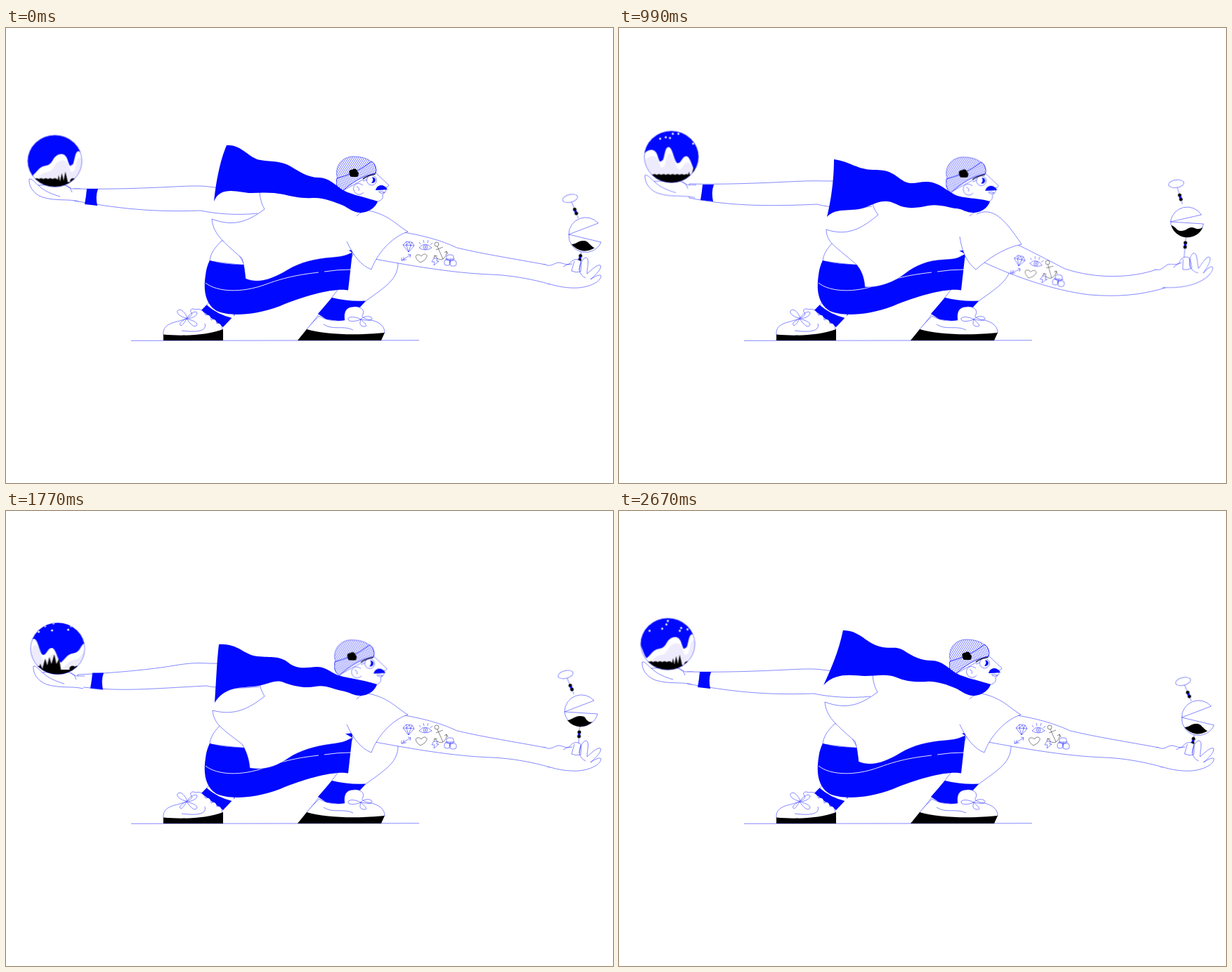
These frames come from a looping animation (864 px wide and 648 px high, 2700 ms). An HTML page without scripts:

```html
<!DOCTYPE html>
<html lang="en">
<head>
<meta charset="utf-8">
<title>Balancing act</title>
<style>
html, body { margin: 0; width: 100%; height: 100%; overflow: hidden; background: #fff; }
svg { display: block; width: 100vw; height: 100vh; fill: #fff; stroke: #0008ff; stroke-width: .48; stroke-linejoin: round; }
.move { animation: 2.7s linear infinite; }
.blue { fill: #0008ff; stroke: none; }
.black { fill: #000; stroke: none; }
.line { fill: none; }

#scarf { animation-name: scarf; }
@keyframes scarf {
  0%, 100% { d: path("M314 167C335 165 345 185 362 188S392 189 405 197S430 213 445 213S470 225 480 231S515 242 529 247C527 254 517 263 505 263S488 256 478 252S452 241 436 242S408 240 395 237S365 234 350 235S306 222 296 247C298 225 304 190 314 167Z"); }
  22.2% { d: path("M307 181C330 179 342 198 362 200S392 201 403 209S425 219 440 219S466 229 476 236S515 242 528 247C526 254 517 263 505 263S488 258 478 255S452 245 438 248S408 243 395 240S370 243 352 245S308 240 296 263C295 240 300 200 307 181Z"); }
  36.7% { d: path("M306 187C328 190 340 202 362 202S388 206 402 216S425 218 440 219S466 231 477 237S515 242 528 247C526 254 517 263 505 263S490 258 480 257S455 250 440 253S410 259 395 251S370 247 352 255S310 254 296 269C302 245 306 215 306 187Z"); }
  47.8% { d: path("M304 196C322 198 330 209 350 207S384 210 397 218S425 221 438 223S460 235 475 235S515 242 528 246C526 254 517 263 505 263S490 260 478 259S452 250 436 251S408 256 392 253S368 247 350 256S315 260 295 278C295 250 297 220 304 196Z"); }
  65.6% { d: path("M303 190C330 188 338 205 358 207S390 206 402 216S428 223 442 222S464 232 476 235S515 242 528 247C526 254 517 263 505 263S490 258 478 256S455 247 440 250S408 249 395 244S372 248 352 250S312 250 297 273C299 245 300 215 303 190Z"); }
  81.1% { d: path("M311 175C328 178 340 194 360 192S390 197 400 207S428 212 440 213S466 226 477 231S515 242 529 247C527 254 517 263 505 263S488 256 478 252S452 241 438 245S408 244 395 239S368 235 350 242S312 241 295 257C305 230 310 205 311 175Z"); }
  98.9% { d: path("M319 170C342 170 350 186 368 192S394 191 406 199S430 213 445 213S470 225 480 231S515 242 529 247C527 254 517 263 505 263S488 256 478 252S452 242 438 243S408 243 395 237S365 235 350 235S310 228 291 248C302 225 313 200 319 170Z"); }
}

#shirt { animation-name: shirt; }
@keyframes shirt {
  0%, 98.9%, 100% { d: path("M361 234Q362 248 368 258C345 275 325 284 293 272C295 292 306 302 336 328C339 337 340 348 341 357C360 365 380 357 400 345S440 329 462 327S482 324 493 320"); }
  22.2% { d: path("M361 242Q362 256 369 266C345 283 325 291 294 283C296 303 304 310 335 328C340 336 344 348 345 361C366 369 388 362 405 350S440 331 462 328S482 324 493 320"); }
  36.7% { d: path("M360 246Q362 258 369 266C345 286 325 297 295 287C296 305 304 308 337 336C344 343 349 354 350 369C370 370 392 362 407 350S440 331 462 330S482 327 493 322"); }
  47.8% { d: path("M361 250Q363 262 369 271C345 288 325 302 296 290C297 308 306 314 338 336C345 344 349 354 351 367C372 369 392 371 405 357S440 338 462 334S482 324 493 317"); }
  65.6% { d: path("M361 246Q362 254 368 264C345 282 325 292 294 284C296 303 306 309 336 332C341 340 346 352 347 366C368 370 386 363 402 352S440 335 462 332S482 328 493 323"); }
  81.1% { d: path("M361 238Q362 252 368 263C345 278 325 290 293 278C295 296 306 306 336 329C339 338 342 349 343 360C363 362 384 359 402 347S440 334 462 331S482 323 493 317"); }
}

#sleeve { animation-name: sleeve; }
@keyframes sleeve {
  0%, 65.6%, 100% { d: path("M516 260C545 266 555 280 572 290C548 298 528 322 520 344C505 338 495 325 485 304"); }
  22.2% { d: path("M508 265C530 255 550 270 573 304C548 314 528 328 510 345C496 335 489 322 484 298"); }
  36.7% { d: path("M509 265C532 254 549 272 573 308C545 314 524 330 508 344C495 334 488 318 485 297"); }
  47.8% { d: path("M509 265C532 257 550 273 575 300C547 306 527 325 515 344C501 336 492 322 488 300"); }
}

#reach { animation-name: reach; }
@keyframes reach {
  0%, 65.6%, 100% { d: path("M560 290C600 296 625 305 642 313C680 322 725 329 768 337L775 365C750 358 720 352 690 351C640 349 590 341 525 329"); }
  22.2% { d: path("M562 302C590 318 610 328 632 337C680 355 730 354 766 344L776 371C740 380 700 378 660 373C610 367 565 350 522 332"); }
  36.7% { d: path("M560 305C595 322 615 333 635 343C680 358 730 356 765 344L778 370C740 381 710 383 670 380C620 374 565 355 520 334"); }
  47.8% { d: path("M560 297C595 306 620 316 643 325C685 333 730 339 767 340L776 365C740 363 710 365 670 361C620 355 575 344 522 329"); }
}

#hand { animation-name: hand; transform-origin: 780px 345px; }
@keyframes hand {
  0%, 65.6%, 100% { transform: none; }
  22.2% { transform: translate(-2px, 5px) rotate(-8deg); }
  36.7% { transform: translate(-2px, 4px) rotate(-14deg); }
  47.8% { transform: translate(-1px, 2px) rotate(-7deg); }
}

#ink { animation-name: ink; }
@keyframes ink {
  0%, 65.6%, 100% { transform: translate(573px, 311px) rotate(0deg); }
  22.2% { transform: translate(570px, 327px) rotate(8deg); }
  36.7% { transform: translate(570px, 331px) rotate(8.5deg); }
  47.8% { transform: translate(573px, 321px) rotate(3.5deg); }
}

#hold { animation-name: hold; }
@keyframes hold {
  0%, 98.9%, 100% { d: path("M305 228C280 225 280 224 240 226S150 230 97 229L97 246C150 255 200 263 277 260C300 265 330 267 358 264"); }
  22.2% { d: path("M305 223C280 222 280 222 240 222S150 225 95 222L95 241C150 252 200 259 277 257C300 262 330 265 357 263"); }
  36.7% { d: path("M310 218C280 218 280 217 240 219S150 223 100 222L100 242C150 252 200 255 282 251C300 256 330 258 360 254"); }
  47.8% { d: path("M310 216C280 216 280 212 240 218S150 226 103 228L103 246C150 252 200 254 285 247C300 250 330 252 360 248"); }
  65.6% { d: path("M310 217C280 218 275 214 240 220S150 231 102 233L102 250C165 258 205 253 285 249C300 252 330 254 361 250"); }
  81.1% { d: path("M308 223C280 223 280 220 240 224S150 230 98 229L98 246C150 257 210 262 281 257C300 262 330 264 361 261"); }
}

#palm { animation-name: palm; }
@keyframes palm {
  0%, 98.9%, 100% { transform: none; }
  22.2% { transform: translate(-.5px, -7px); }
  36.7% { transform: translate(4px, -5.5px); }
  47.8% { transform: translate(7px, 2px); }
  65.6% { transform: translate(6px, 6px); }
  81.1% { transform: translate(1.5px, 2px); }
}

#band { animation-name: band; }
@keyframes band {
  0%, 98.9%, 100% { transform: none; }
  22.2% { transform: translate(-1px, -5.5px); }
  36.7% { transform: translate(4px, -6px); }
  47.8% { transform: translate(8.5px, -2.5px); }
  65.6% { transform: translate(8px, 1.5px); }
  81.1% { transform: translate(2px, .5px); }
}

#globe { animation-name: globe; }
@keyframes globe {
  0%, 98.9%, 100% { transform: translate(69.5px, 189.5px); }
  22.2% { transform: translate(70px, 181.5px); }
  28.9% { transform: translate(72px, 179.5px); }
  36.7% { transform: translate(74.5px, 183.5px); }
  47.8% { transform: translate(76.5px, 192.3px); }
  65.6% { transform: translate(73.5px, 196px); }
  81.1% { transform: translate(70px, 193px); }
}
#hills { animation-name: hills; }
@keyframes hills { to { transform: translate(-103px); } }
#trees { animation-name: trees; }
@keyframes trees { to { transform: translate(-172px); } }

#snow { animation-name: season; fill: none; stroke: #fff; stroke-width: 3; stroke-linecap: round; }
@keyframes season { 0%, 7% { opacity: 0; } 7.01%, 100% { opacity: 1; } }
#snow path { animation: fall 2.7s linear infinite; }
@keyframes fall {
  0% { opacity: 1; transform: translateY(-4px); }
  17% { opacity: 1; transform: translateY(4px); }
  17.01%, 100% { opacity: 0; }
}

#head { animation-name: head; }
@keyframes head {
  0%, 98.9%, 100% { transform: none; }
  22.2% { transform: translate(-1.5px, 0); }
  36.7% { transform: translate(-4.7px, .8px); }
  47.8% { transform: translate(-5.5px, 1.2px); }
  65.6% { transform: translate(-2.8px, .5px); }
  81.1% { transform: translate(-.4px, 0); }
}

#toy { animation-name: toy; }
@keyframes toy {
  0%, 98.9%, 100% { transform: translate(824px, 293px); }
  22.2% { transform: translate(813px, 278px); }
  36.7% { transform: translate(809px, 274px); }
  47.8% { transform: translate(815px, 276px); }
  65.6% { transform: translate(818px, 283px); }
  81.1% { transform: translate(827px, 288px); }
}
#ring { animation-name: ring; }
@keyframes ring {
  0%, 98.9%, 100% { transform: rotate(-22.8deg); }
  22.2% { transform: rotate(-26deg); }
  36.7% { transform: rotate(-17deg); }
  47.8% { transform: rotate(-15.6deg); }
  65.6% { transform: rotate(-23.3deg); }
  81.1% { transform: rotate(-22.3deg); }
}
#stem { animation-name: stem; }
@keyframes stem {
  0%, 98.9%, 100% { transform: rotate(11.3deg); }
  22.2%, 36.7% { transform: rotate(5deg); }
  47.8%, 65.6% { transform: rotate(3.6deg); }
  81.1% { transform: rotate(15deg); }
}
#bowl { animation-name: bowl; }
@keyframes bowl {
  0%, 98.9%, 100% { d: path("M19-15A24 24 0 0 0-23 1A24 24 0 0 0 23 12L-23 1Z"); }
  22.2% { d: path("M17-15A24 24 0 0 0-23 3A24 24 0 0 0 24 9L-23 3Z"); }
  36.7% { d: path("M20-8A24 24 0 0 0-24 2A24 24 0 0 0 23 5L-24 2Z"); }
  47.8% { d: path("M19-10A24 24 0 0 0-23 1A24 24 0 0 0 24 4L-23 1Z"); }
  65.6% { d: path("M19-13A24 24 0 0 0-23 3A24 24 0 0 0 24 6L-23 3Z"); }
  81.1% { d: path("M17-12A24 24 0 0 0-23 2A24 24 0 0 0 22 14L-23 2Z"); }
}
#drink { animation-name: drink; }
@keyframes drink {
  0%, 98.9%, 100% { d: path("M-19 15C-13 15-9 10-3 10S4 12 7 15S12 20 14 20A24 24 0 0 1-19 15Z"); }
  22.2% { d: path("M-18 15C-11 14-8 11-2 11S5 12 8 15S14 17 18 16A24 24 0 0 1-18 15Z"); }
  36.7% { d: path("M-23 7C-17 8-16 15-9 15S1 10 6 10S14 15 22 10A24 24 0 0 1-23 7Z"); }
  47.8% { d: path("M-22 8C-16 8-14 14-7 14S1 9 6 9S16 13 23 10A24 24 0 0 1-22 8Z"); }
  65.6% { d: path("M-19 15C-13 15-9 9-1 9S6 12 9 15S14 18 17 17A24 24 0 0 1-19 15Z"); }
  81.1% { d: path("M-23 4C-18 5-14 15-6 15S2 11 7 10S15 13 18 16A24 24 0 0 1-23 4Z"); }
}
</style>
</head>
<body>
<svg viewBox="0 0 864 648">
  <defs>
    <pattern id="knit" width="2.4" height="8" patternUnits="userSpaceOnUse" patternTransform="rotate(-32)">
      <path d="M1.2 0V8" stroke-width=".55"/>
    </pattern>
    <pattern id="rib" width="2.2" height="8" patternUnits="userSpaceOnUse" patternTransform="rotate(-20)">
      <path d="M1.1 0V8" stroke-width=".55"/>
    </pattern>
    <clipPath id="ball"><ellipse rx="38.5" ry="36.7"/></clipPath>
    <path id="ridge" d="M-31 60V20C-26 16-22 8-15 7S-6 4-2-3S14-15 18-2S22 6 25 5S28-15 34-14S42 9 47 9S53-1 59-1S68 18 72 20V60Z"/>
    <g id="forest">
      <path d="M-30 30H142V40H-30Z"/>
      <path d="M-26 29H2M26 29H86M134 29H142" stroke="#000" stroke-width="9" stroke-linecap="round" stroke-dasharray="0 6.5"/>
      <path d="M3 32l2.5-12 2 9 2.5-12 2.5 11 2.5-13 4 17zM85 34l3-13 3 8 4-15 3 10 3-12 3 10 4-14 3 14 4-8 3 20z"/>
    </g>
    <g id="beads">
      <circle cy="-3" r="2.5" class="black"/><circle cy="3" r="2.5" class="black"/><circle r="1.8" class="blue"/>
    </g>
  </defs>

  <path d="M178 445.3L588 444.8"/>

  <!-- back leg -->
  <path class="blue" d="M290 390L326 408L309 426L278 402Z"/>
  <path d="M287 391Q302 405 324 410" stroke="#fff" stroke-width="7" class="line"/>
  <path class="line" d="M291 389L279 402"/>
  <path d="M224 437C223 427 229 422 240 419C252 416 264 412 265 407C260 402 264 398 270 401C276 399 281 402 284 409C289 407 292 411 292 416C296 413 300 416 300 421C305 419 308 424 308 432L300 440H226Z"/>
  <path class="black" d="M224 436.5C250 439 285 438 309 429V445H224Z"/>
  <path class="line" d="M250 431C265 433 287 434 283 421M257 413C248 412 241 405 245 402S255 405 258 413C262 405 272 402 272 406S264 414 257 414C265 416 275 420 271 424S260 418 257 414C252 416 246 420 248 423S255 418 257 414"/>

  <!-- front leg -->
  <path d="M473 372L428 430H470L512 389C540 368 560 358 558 330L495 320Z"/>
  <path class="blue" d="M464 384Q488 390 512 388.5L500 402L482 418L456 415L444 407Z"/>
  <path d="M428 429Q437 418 446 410C456 417 470 418 482 416C480 402 486 397 495 397C504 396 511 401 508 408C504 412 512 415 520 416C532 419 539 425 539 434L520 440H440Z"/>
  <path class="black" d="M428 429C455 437 500 438 539 434L534 445H415Z"/>
  <path class="line" d="M452 422C465 431 480 423 494 430M505 415C496 410 486 411 487 415S498 418 505 415C510 409 521 410 521 414S511 416 505 415C512 421 516 426 509 425S504 419 505 415"/>

  <!-- shorts -->
  <path d="M307 303C297 313 291 321 290 332L340 338L320 303Z"/>
  <path class="blue" d="M290 331Q310 337 340 337L493.5 316L487 373.5C470 370 430 379 390 396C350 411 315 410 300 403C280 391 282 365 284 352C285 343 287 337 290 331Z"/>
  <path class="line" stroke="#fff" stroke-width=".9" d="M284 363C300 376 335 378 370 365S430 350 445 348M453 347Q472 344 491 344"/>

  <path id="shirt" class="move"/>

  <!-- toy in the front hand -->
  <path id="reach" class="move"/>
  <g id="ink" class="move line">
    <path d="M-8-2l5-5 8 1 3 5-8 9zM-8-2l16 1M-3-7l0 5 3 10 3-9 2-5M-3-2l4-4 2 5"/>
    <path d="M15 2Q23-8 33 2Q24 8 15 2M17-3l-2-3M22-5l-1-4M27-5l1-4M31-2l3-3"/>
    <circle cx="24" cy="1" r="3"/>
    <circle cx="24" cy="1" r="1"/>
    <path stroke="#000" d="M41 0L49 18M39 5l10-4M37 13Q43 21 49 18Q55 13 54 7M36 17l1-4 4 1M51 9l3-2 2 4"/>
    <circle cx="40" cy="-3" r="3" stroke="#000"/>
    <path stroke="#000" d="M17 23C9 18 9 12 13 12Q16 11 18 14C22 9 27 11 26 15Q24 20 17 23Z"/>
    <path d="M-10 20L3 12M-1 11l4 1-1 4M-10 16v4h4M-7 15v4h4"/>
    <path d="M36 17l5 0-1 4 3 0-7 6 1-5-4 0z"/>
    <rect x="54" y="12" width="10" height="8" rx="3"/>
    <rect x="51" y="19" width="8" height="8" rx="3"/>
    <rect x="59" y="20" width="9" height="8" rx="3"/>
    <path d="M52 18h14M58 24l2-6"/>
  </g>
  <g id="toy" class="move">
    <g id="ring" class="move">
      <path d="M0-24V-50"/>
      <ellipse cy="-54.5" rx="11" ry="5.5" transform="rotate(9 0 -54)"/>
      <use href="#beads" y="-34.5"/>
    </g>
    <g id="stem" class="move">
      <path d="M0 24V53"/>
      <use href="#beads" y="35"/>
    </g>
    <path id="bowl" class="move"/>
    <path id="drink" class="move black"/>
  </g>
  <g id="hand" class="move">
    <path d="M765 336.5L768 337C776 341 781 334 787 334C794 335 797 338 802 336C806 329 813 328 818 332L816 345C816 337 821 327 826 327C831 329 827 342 827 350C834 344 842 336 846 338C849 342 839 352 832 358C838 354 845 350 847 353C847 359 836 368 815 370C800 371 785 368 775 365L770 364"/>
    <path class="line" d="M809 332L805 346Q811 349 818 347L819 334M793 340Q798 336 806 336M816 345Q818 353 825 356"/>
  </g>
  <path id="sleeve" class="move"/>
  <path class="line" d="M499 268Q503 263 508 262"/>

  <!-- arm with the snow globe -->
  <path id="hold" class="move"/>
  <g id="palm" class="move">
    <path d="M106 229H94Q88 226 80 222L46 224C41 220 37 214 33 215C32 224 38 236 52 241C72 247 88 243 104 247"/>
    <path class="line" d="M46 224C54 232 66 237 77 240M86 224Q93 228 94 234"/>
  </g>
  <path id="band" class="move blue" d="M115 229H131Q127 240 130 253L112 251Q114 240 115 229Z"/>
  <g id="globe" class="move">
    <g clip-path="url(#ball)" stroke="none">
      <ellipse rx="39" ry="37" class="blue"/>
      <g id="snow" class="move">
        <path style="animation-delay:-2.33s" d="M-14-28h0m6 1h0m6 0h0m-3-8h0m20 3h0"/>
        <path style="animation-delay:-1.94s" d="M2-33h0m-4 6h0m-14 1h0m8-2h0m18-5h0m21 14h0"/>
        <path style="animation-delay:-1.64s" d="M-12-32h0m12 5h0m5-7h0m13 5h0m-49 17h0m35-4h0m-7-6h0"/>
        <path style="animation-delay:-1.16s" d="M-18-32h0m12-4h0m-2 10h0m23-1h0m-42 3h0m46-8h0"/>
        <path style="animation-delay:-.74s" d="M-10-30h0m5-4h0m10 2h0m5 5h0m-17 9h0m23-2h0"/>
        <path style="animation-delay:-.26s" d="M0-33h0m-2 5h0m21 5h0m-2 4h0m11-2h0m-54 2h0m18-3h0"/>
      </g>
      <g id="hills" class="move">
        <use href="#ridge"/><use href="#ridge" x="103"/>
        <g fill="#eeecfc"><use href="#ridge" x="2" y="9"/><use href="#ridge" x="105" y="9"/></g>
      </g>
      <g id="trees" class="move" fill="#000">
        <use href="#forest"/><use href="#forest" x="172"/>
      </g>
    </g>
    <ellipse class="line" rx="38.5" ry="36.7"/>
  </g>

  <!-- head -->
  <g id="head" class="move">
    <path d="M477 233L526 206L545 224Q544 227 540 227L541 232Q538 236 536 237Q538 244 530 247L490 244Z"/>
    <path fill="url(#knit)" d="M472 215C466 196 480 183 494 183C508 183 518 187 522 193L500 210Z"/>
    <path fill="#fff" d="M471 214C490 209 507 201 520 190C526 193 528 202 526 207C508 210 492 220 477 234C471 229 469 222 471 214Z"/>
    <path fill="url(#rib)" d="M471 214C490 209 507 201 520 190C526 193 528 202 526 207C508 210 492 220 477 234C471 229 469 222 471 214Z"/>
    <path class="black" d="M489 208C487 203 491 201 493 202C495 199 500 201 500 204C503 206 502 211 500 212L492 212Q489 211 489 208Z"/>
    <path class="line" d="M508 224C500 218 493 224 495 231S505 239 509 234M499 226Q504 227 502 232M508 218L514 216"/>
    <circle cx="520.5" cy="216.8" r="7"/>
    <path class="blue" d="M521 212.5A4.2 4.2 0 1 1 520 220.5Q524 216.5 521 212.5Z"/>
    <path class="line" stroke="#000" stroke-width="1.2" d="M508 215Q514 210 526 208"/>
    <path class="blue" d="M526 231C528 223 538 221 543 230Q534 231 526 231Z"/>
    <path class="line" d="M530 233Q535 232 539 234Q535 237 531 234"/>
  </g>

  <path id="scarf" class="move blue"/>
</svg>
</body>
</html>
```
